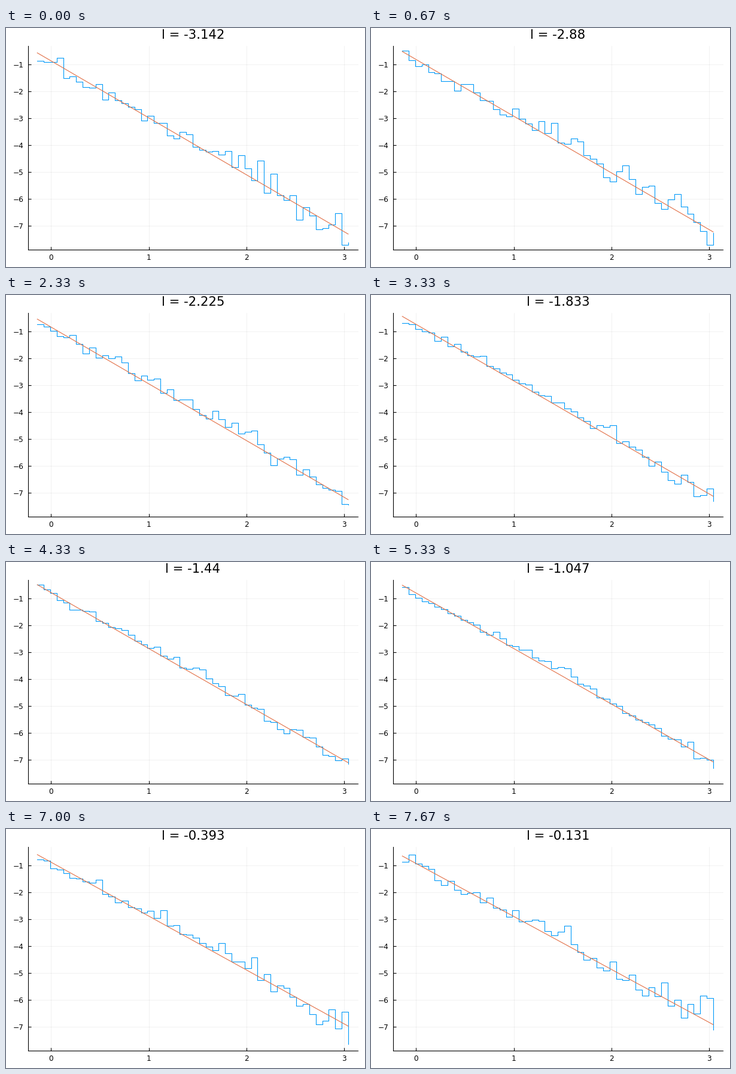
These frames come from a looping animation (600x400 px, 8000 ms). A matplotlib script:

```python
import numpy as np
import matplotlib.pyplot as plt
from matplotlib.animation import FuncAnimation

WIDTH, HEIGHT = 600, 400
LOOP_MS, TICK_MS = 8000, 40
VALUES = 24
STEPS = 49
BLUE, ORANGE = "#009af9", "#e26f46"

# Plot area and data scale in pixels, y counted from the top
LEFT, RIGHT, TOP, BOTTOM = 37, 588.5, 30, 371
X_ZERO, X_UNIT = 75.3, 163.35
Y_ZERO, Y_UNIT = 16.4, 45

# Key points of the fitted line's two ends over the run
FIT_AT = [0, 2, 5, 10, 13, 18, 23]
FIT_START = [-0.56, -0.51, -0.60, -0.43, -0.48, -0.51, -0.64]
FIT_END = [-7.30, -7.22, -7.33, -7.12, -7.10, -7.05, -6.91]

t = np.linspace(0, 1, STEPS)
x = np.linspace(-0.1407, 3.04, STEPS)


def fit_ends(k):
    return [np.interp(k, FIT_AT, ends) for ends in (FIT_START, FIT_END)]


def spectrum(k):
    """Line with a slight bow and upward-skewed noise that grows to the right."""
    start, end = fit_ends(k)
    bow = -0.13 * np.cos(2 * np.pi * t)
    noise = np.random.default_rng(100 + k).gumbel(-0.45, 0.78, STEPS)
    loudness = np.interp(k, [0, 17, 23], [1.4, 0.4, 1.3])
    level = start + (end - start) * t + bow
    level += loudness * (0.13 + 0.22 * t ** 2) * np.clip(noise, -1.6, 2.2)
    return np.clip(level, -7.7, -0.33)


def x_at(px):
    return (px - X_ZERO) / X_UNIT


def y_at(px):
    return (Y_ZERO - px) / Y_UNIT


plt.rcParams["font.family"] = "DejaVu Sans"
fig = plt.figure(figsize=(WIDTH / 100, HEIGHT / 100), dpi=100, facecolor="white")
ax = fig.add_axes([LEFT / WIDTH, 1 - BOTTOM / HEIGHT,
                   (RIGHT - LEFT) / WIDTH, (BOTTOM - TOP) / HEIGHT])
ax.set_xlim(x_at(LEFT), x_at(RIGHT))
ax.set_ylim(y_at(BOTTOM), y_at(TOP))
ax.set_xticks(range(4))
ax.set_yticks(range(-7, 0))
ax.grid(color="black", alpha=0.08, linewidth=0.5)
ax.set_axisbelow(True)
ax.spines[["top", "right"]].set_visible(False)
ax.spines[["left", "bottom"]].set_linewidth(0.8)
ax.tick_params(direction="in", length=3.6, width=0.8, labelsize=8.74)
ax.tick_params(axis="x", pad=5)
ax.tick_params(axis="y", pad=5.2)

trace, = ax.plot([], [], color=BLUE, linewidth=0.8, drawstyle="steps-post")
fit, = ax.plot([], [], color=ORANGE, linewidth=0.8)
title = fig.text(312.5 / WIDTH, 382 / HEIGHT, "", fontsize=15.3,
                 ha="center", va="baseline")


def draw(tick):
    # Look slightly ahead so that a change never falls one tick late
    now = tick * TICK_MS + 0.75 * TICK_MS
    k = int(now * VALUES / LOOP_MS)
    trace.set_data(x, spectrum(k))
    fit.set_data(x[[0, -1]], fit_ends(k))
    title.set_text(f"l = {round(-np.pi + k * np.pi / VALUES, 3)}")
    return trace, fit, title


anim = FuncAnimation(fig, draw, frames=LOOP_MS // TICK_MS, interval=TICK_MS,
                     init_func=lambda: draw(0), repeat=True, repeat_delay=0)
plt.show()
```
